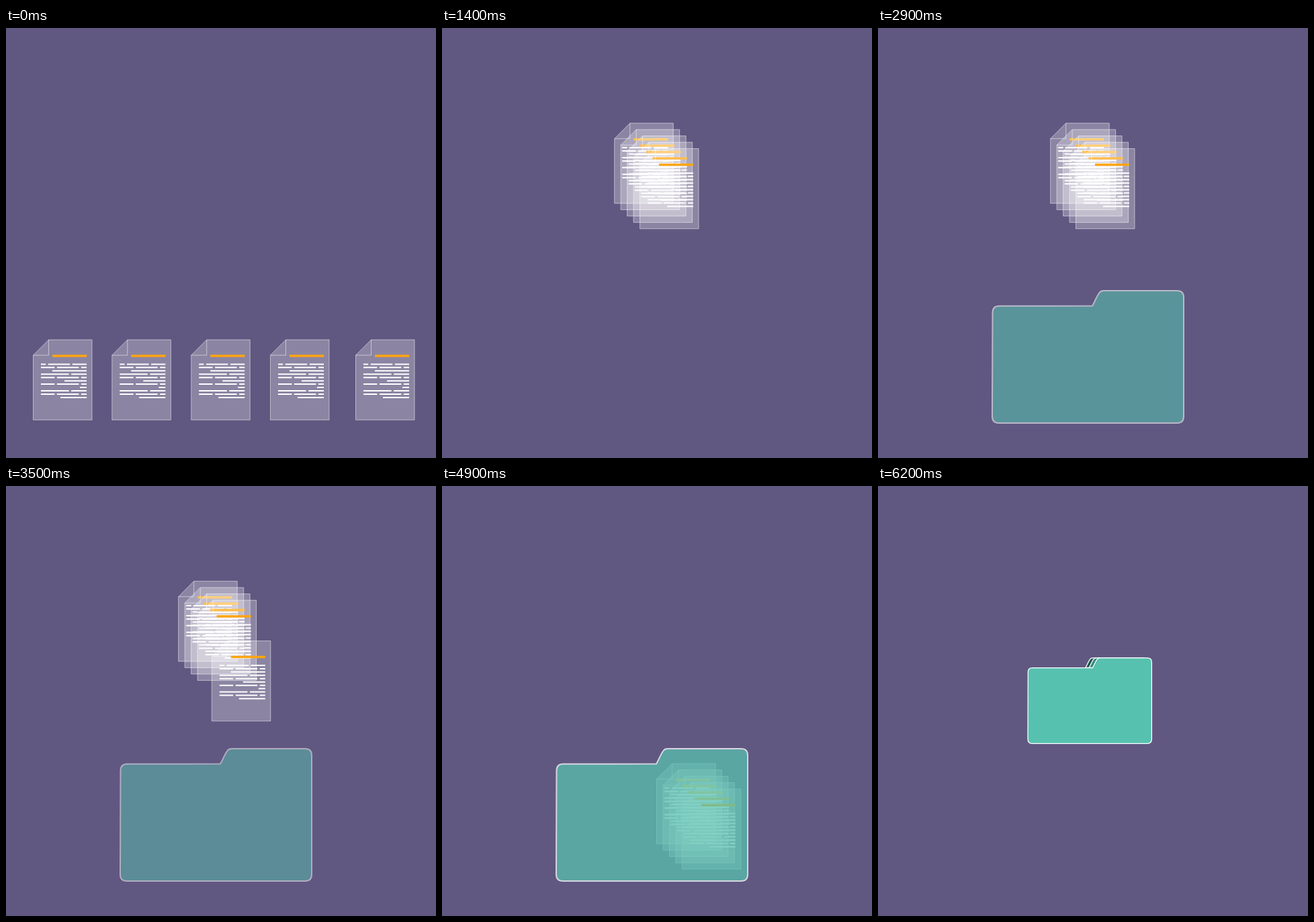
Recreate the animation shown at these times as an HTML page. Size 640 by 640 pixels, loop 7.5 s.

```html
<!DOCTYPE html>
<html lang="en">
<head>
<meta charset="utf-8">
<title>Papers into a folder</title>
<style>
  html, body { margin: 0; width: 100%; height: 100%; overflow: hidden; background: #605881; }
  svg { display: block; width: 100%; height: 100%; }
</style>
</head>
<body>
<svg viewBox="0 0 640 640">
  <defs>
    <g id="sheet">
      <path d="M0 23 23 0H87.5V119.3H0Z" fill="#fff" fill-opacity=".27"/>
      <path d="M0 23 23 0H87.5V119.3H0ZH23V0" fill="none" stroke="#fff" stroke-opacity=".5"/>
      <path id="text" stroke="#fff" stroke-width="2"/>
      <path d="M28.5 24H79.7" stroke="#ffa50f" stroke-width="3.6"/>
    </g>
    <path id="tab" d="M319 413.6C323 407 325 400 329.5 394Q331.5 391 336 391H445V413.6Z"/>
  </defs>
  <g id="sheets"></g>
  <g id="folder" stroke="#fff" stroke-width="2">
    <g id="tabs">
      <use id="backTab" href="#tab" fill="#1b5a50"/>
      <use id="midTab" href="#tab" fill="#38897b"/>
    </g>
    <path fill="#57c1af" d="M180.5 413.8 319 413.6C323 407 325 400 329.5 394Q331.5 391 336 391H445Q455 391 455 401V578Q455 588 445 588H180Q170 588 170 578L170.5 423.8Q170.5 413.8 180.5 413.8Z"/>
  </g>
</svg>
<script>
const LOOP = 7500, STEP = 100;
const $ = id => document.getElementById(id);

// Full rows have gaps that sway across the page; a few rows are short and unbroken
const LEFT = 11.5, RIGHT = 79.5, GAP = 3.5;
const indents = { 2: 17, 5: 35, 7: 58, 10: 29 };

function rowPath(i) {
  const indent = indents[i] || 0;
  const sway = 28 - 19 * Math.cos(i * 2 * Math.PI / 5);
  const gaps = indent ? [] : [sway, sway + 36].filter(x => x < 65);
  const y = 36.4 + 4.95 * i;
  const cuts = gaps.map(x => `H${LEFT + x - GAP / 2}m${GAP} 0`).join('');
  return `M${LEFT + indent} ${y}${cuts}H${RIGHT}`;
}
$('text').setAttribute('d', Array.from({ length: 11 }, (_, i) => rowPath(i)).join(''));

const sheets = [40.5, 157.8, 275.7, 393.5, 520.5].map(startX => {
  const el = document.createElementNS('http://www.w3.org/2000/svg', 'use');
  el.setAttribute('href', '#sheet');
  $('sheets').append(el);
  return { el, startX };
});

const mix = (a, b, p) => a + (b - a) * p;
const linear = (t, start, length) => Math.min(1, Math.max(0, (t - start) / length));
const smooth = (t, start, length) => {
  const p = linear(t, start, length);
  return p * p * (3 - 2 * p);
};
// S-curve with a quick middle and a long soft landing
const swoop = (t, start, length) => {
  const p = linear(t, start, length);
  return p ** 2.5 / (p ** 2.5 + 0.277 * (1 - p) ** 2.5);
};
const move = (el, x, y, more = '') => el.setAttribute('transform', `translate(${x} ${y})${more}`);
const show = (el, visible) => el.setAttribute('display', visible ? 'inline' : 'none');

function draw(t) {
  sheets.forEach(({ el, startX }, i) => {
    const gather = i ? smooth(t, 500 + i * 100, 500) : smooth(t, 600, 400);
    const drop = swoop(t, 3800 - i * 100, 400);
    move(el, mix(startX, 256.7 + i * 9.45, gather) + 62.8 * drop,
      mix(464, 141.7 + i * 9.45, gather) + 271.5 * drop);
  });
  show($('sheets'), t < 5100);

  const spread = smooth(t, 5100, 500);
  show($('tabs'), spread > 0);
  move($('backTab'), -16.4 * spread, 0);
  move($('midTab'), -8.2 * spread, 0);

  const rise = smooth(t, 1800, 400);
  const lift = swoop(t, 5900, 300);
  const scale = mix(1, 0.647, linear(t, 5900, 300));
  show($('folder'), rise > 0);
  $('folder').setAttribute('opacity', 1 - 0.5 * (smooth(t, 2600, 400) - smooth(t, 4700, 400)));
  move($('folder'), mix(312.5, 315.2, lift), mix(489.5, 319.6, lift) + 250 * (1 - rise),
    ` scale(${scale}) translate(-312.5 -489.5)`);
}

function tick(now) {
  draw(Math.floor(now / STEP) * STEP % LOOP);
  requestAnimationFrame(tick);
}
draw(0);
requestAnimationFrame(tick);
</script>
</body>
</html>
```
